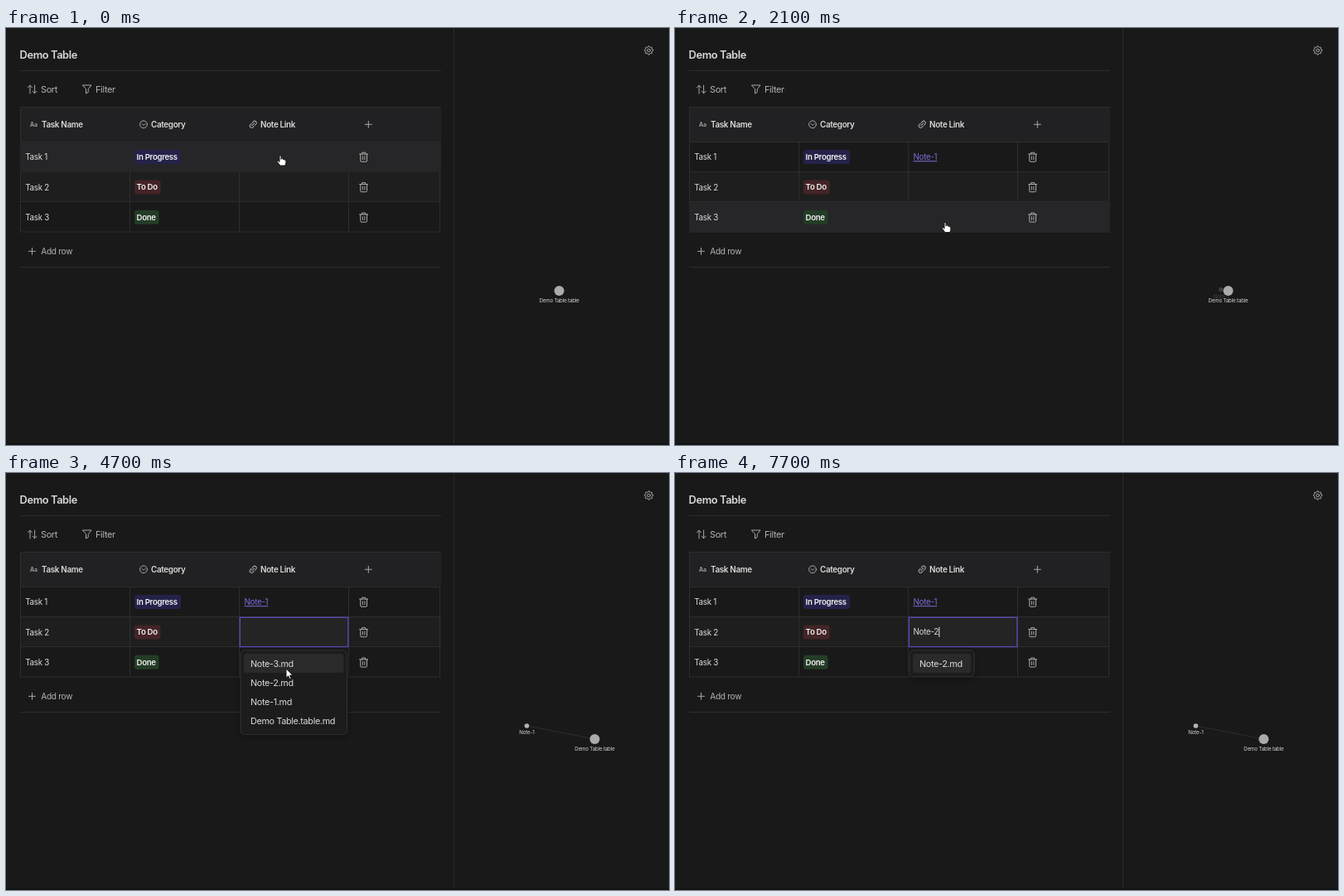
An HTML page for the animation above (8000 ms loop, 800x503 px).

```html
<!DOCTYPE html>
<html lang="en">
<head>
<meta charset="utf-8">
<title>Demo Table</title>
<style>
  html, body { margin: 0; width: 100%; height: 100%; overflow: hidden; background: #191919; }
  svg { display: block; width: 800px; height: 503px; }
  text { font: 9.8px Inter, sans-serif; letter-spacing: -.03em; fill: #dadada; }
  .bold { font-weight: 600; }
  .tool { font-size: 10.9px; fill: #b3b3b3; }
  .item { font-size: 10.8px; }
  .label { font-size: 6.2px; text-anchor: middle; fill: #d4d4d4; }
  .icon { fill: none; stroke: #a8a8a8; stroke-width: 1; stroke-linecap: round; stroke-linejoin: round; }
  .rule { fill: none; stroke: #2d2d2d; }
  .cursor { fill: #fff; stroke: #111; stroke-width: .9; stroke-linejoin: round; }
</style>
</head>
<body>
<svg viewBox="0 0 800 503">
  <defs>
    <g id="trash" class="icon">
      <path d="M-5-3.6H5M-2-3.6V-5.5H2V-3.6M-3.9-3.6V4.3Q-3.9 5.6-2.6 5.6H2.6Q3.9 5.6 3.9 4.3V-3.6M-1.3-1V3M1.3-1V3"/>
    </g>
    <path id="plus" class="icon" d="M-4 0H4M0-4V4"/>
    <filter id="shadow" x="-20%" y="-20%" width="140%" height="150%">
      <feDropShadow dx="0" dy="3" stdDeviation="4" flood-color="#000" flood-opacity=".35"/>
    </filter>
  </defs>

  <rect width="800" height="503" fill="#191919"/>
  <path class="rule" d="M540.5 0V503" stroke-opacity=".8"/>
  <rect y="501" width="800" height="2" fill="#121212"/>

  <text x="16.6" y="36.8" style="font-size:12.8px;font-weight:600">Demo Table</text>
  <path class="rule" d="M17 51.5H525M17 288.5H525"/>
  <path class="icon" d="M29 79V69.2M26.5 71.8L29 69.2L31.5 71.8M34.6 69V78.8M32.2 76.2L34.6 78.8L37 76.2"/>
  <text class="tool" x="42" y="77.6">Sort</text>
  <path class="icon" d="M92.7 69H103L99.2 73.8V77.5L96.5 79V73.8Z"/>
  <text class="tool" x="108" y="77.6">Filter</text>

  <rect x="17" y="95.5" width="508" height="42" fill="#212123"/>
  <rect x="17" y="173.5" width="508" height="36.5" fill="#1e1e1f"/>
  <path class="rule" d="M17 95.5H524.5M17 137.5H524M17 173.5H524M17 209.5H524M17 246H524M17.5 95.5V246M523.5 137.5V246M149.5 137.5V246M281.5 137.5V246M413.5 137.5V246"/>
  <rect id="hover" x="17" width="508" height="36.5" fill="#262628"/>

  <text x="29" y="118.6" style="font-size:7px;font-weight:600;fill:#a8a8a8">Aa</text>
  <text class="bold" x="43" y="119.7">Task Name</text>
  <circle class="icon" cx="166" cy="116.3" r="4.4"/>
  <path class="icon" d="M164.2 115.6L166 117.4L167.8 115.6"/>
  <text class="bold" x="175" y="119.7">Category</text>
  <g class="icon" transform="translate(298.2 116.3) rotate(-45)">
    <path d="M-.8-2.2H-2.6A2.2 2.2 0 0 0-2.6 2.2H-.8M.8-2.2H2.6A2.2 2.2 0 0 1 2.6 2.2H.8M-2 0H2"/>
  </g>
  <text class="bold" x="307" y="119.7">Note Link</text>
  <use href="#plus" x="437.3" y="116.3"/>

  <g id="rows"></g>
  <text id="link" x="287.5" y="159.2" fill="#7f6bd8" style="fill:#7f6bd8;text-decoration:underline">Note-1</text>

  <use href="#plus" x="31.5" y="269.3"/>
  <text class="tool" x="42.3" y="273" style="font-size:10.1px">Add row</text>

  <g transform="translate(775.6 27)">
    <path id="gear" class="icon"/>
    <circle class="icon" r="1.8"/>
  </g>

  <path id="edge" class="rule"/>
  <g id="note">
    <circle r="2.8" fill="#b4b4b4"/>
    <text class="label" y="10.4">Note-1</text>
  </g>
  <g id="table">
    <circle r="6" fill="#ababab"/>
    <text class="label" y="14">Demo Table.table</text>
  </g>

  <g id="editor">
    <rect x="282.3" y="137.8" width="130.6" height="35.4" fill="#242425" stroke="#5c48b0" stroke-width="1.4"/>
    <text id="typed" x="287.5" y="158.9"></text>
    <path id="caret" d="M0 149.5V161.5" stroke="#e6e6e6"/>
    <rect id="menu" x="283" y="177.5" rx="5" fill="#1c1c1d" stroke="#303030" filter="url(#shadow)"/>
    <rect id="pick" x="287" height="23" rx="3.5" fill="#2a2a2b"/>
    <g id="items"></g>
  </g>

  <g class="cursor">
    <path id="hand" d="M-1 .3Q0-.7 1 .3V4.4Q2-.0 3.2 4.6Q4.4 3.9 5 5.2Q6.6 4.8 6.8 6.4V8.4Q6.6 10.2 5.6 12H-.2Q-1.8 9.6-3.6 7.6Q-4 6-2.4 6.3L-1 7.6Z"/>
    <path id="arrow" d="M0 0V11.2L2.6 8.8L4.3 12.6L6.1 11.8L4.4 8.1H8Z"/>
    <g id="beam" fill="none">
      <path d="M-2.5-5.5Q0-5.5 0-4Q0-5.5 2.5-5.5M0-4V4M-2.5 5.5Q0 5.5 0 4Q0 5.5 2.5 5.5M-1.6 1H1.6" stroke="#111" stroke-width="2.6"/>
      <path d="M-2.5-5.5Q0-5.5 0-4Q0-5.5 2.5-5.5M0-4V4M-2.5 5.5Q0 5.5 0 4Q0 5.5 2.5 5.5M-1.6 1H1.6" stroke="#eee"/>
    </g>
  </g>
</svg>

<script>
const $ = id => document.getElementById(id);
const LOOP = 8000, STEP = 100, ROW = 36.4, PITCH = 23.2;
const NOTES = ['Note-3.md', 'Note-2.md', 'Note-1.md', 'Demo Table.table.md'];
const OPEN = [300, 3100], CHOSEN = 1900, SPAWN = 2100;
const KEYS = [[5400, 'N'], [5500, 'o'], [5800, 't'], [6100, 'e'], [7500, '-'], [7700, '2']];

// Tracks: time, x, y
const MOUSE = [[0, 331, 154], [400, 331, 154], [800, 332, 179], [1000, 332, 184], [1500, 326, 234.5],
  [2100, 326, 234.5], [2700, 332, 195], [3100, 338, 196], [3400, 339, 209], [3700, 338, 236]];
const NOTE = [[SPAWN, 658.8, 315.5], [2900, 627.6, 305], [4200, 628.4, 305]];
const TABLE = [[SPAWN, 667.5, 317], [2900, 710.4, 321]];

const smooth = u => u * u * (3 - 2 * u);
const easeOut = u => 1 - (1 - u) ** 3;

function along(track, t, ease) {
  const next = track.findIndex(k => k[0] > t);
  if (next === 0) return track[0].slice(1);
  if (next < 0) return track.at(-1).slice(1);
  const a = track[next - 1], b = track[next];
  const u = ease((t - a[0]) / (b[0] - a[0]));
  return [a[1] + (b[1] - a[1]) * u, a[2] + (b[2] - a[2]) * u];
}

function set(el, attrs) {
  for (const name in attrs) el.setAttribute(name, attrs[name]);
}
const show = (el, on) => { el.style.display = on ? '' : 'none'; };
const place = (el, x, y) => set(el, { transform: `translate(${x} ${y})` });

$('rows').innerHTML = [['In Progress', 56, '#25224a'], ['To Do', 31.5, '#442427'], ['Done', 29.5, '#243d26']]
  .map(([name, w, color], i) => `<g transform="translate(0 ${i * ROW})">
    <text x="23.3" y="159.2">Task ${i + 1}</text>
    <rect x="155" y="147" width="${w}" height="17" rx="3" fill="${color}"/>
    <text class="bold" x="157.6" y="159" style="font-size:9.6px;fill:#f0f0f0">${name}</text>
    <use href="#trash" x="431.6" y="155.7"/></g>`).join('');

$('items').innerHTML = NOTES.map(() => '<text class="item" x="295"></text>').join('');
const items = [...$('items').children];

const teeth = Array.from({ length: 32 }, (_, i) => {
  const r = i % 4 < 2 ? 5.2 : 4, a = (i - .5) * Math.PI / 16;
  return `${(r * Math.cos(a)).toFixed(2)} ${(r * Math.sin(a)).toFixed(2)}`;
});
set($('gear'), { d: `M${teeth.join('L')}Z` });

function drawEditor(t, row, y) {
  const keys = row ? KEYS.filter(k => k[0] <= t) : [];
  const text = keys.map(k => k[1]).join('');
  const list = NOTES.filter(n => n.startsWith(text));
  const width = text ? 78 : 128.5;
  place($('editor'), 0, row * ROW);

  $('typed').textContent = text;
  const x = 288.3 + (text ? $('typed').getComputedTextLength() : 0);
  const since = t - (keys.length ? keys.at(-1)[0] : OPEN[row]);
  place($('caret'), x, 0);
  show($('caret'), Math.floor(since / 500) % 2 === 0);

  const over = Math.floor((y - row * ROW - 181.5) / PITCH);
  const picked = text ? 0 : Math.max(0, Math.min(over, list.length - 1));
  set($('menu'), { width, height: list.length * PITCH + 8.6 });
  set($('pick'), { width: width - 8, y: 181.7 + picked * PITCH });
  items.forEach((el, i) => {
    el.textContent = list[i] || '';
    set(el, { y: 197.2 + i * PITCH });
  });
}

function draw(t) {
  const row = t >= OPEN[1] ? 1 : 0;
  const editing = t >= OPEN[row] && (row === 1 || t < CHOSEN);
  const [x, y] = along(MOUSE, t, smooth);
  const typing = t >= KEYS[0][0];
  const onMenu = editing && y > 174 + row * ROW;

  show($('editor'), editing);
  if (editing) drawEditor(t, row, y);

  const shape = typing ? '' : onMenu ? 'arrow' : editing ? 'beam' : 'hand';
  for (const id of ['hand', 'arrow', 'beam']) {
    show($(id), id === shape);
    place($(id), x, y);
  }
  show($('hover'), !typing && !onMenu);
  set($('hover'), { y: 137.5 + ROW * Math.floor((y - 137.5) / ROW) });
  show($('link'), t >= CHOSEN);

  const [nx, ny] = along(NOTE, t, easeOut), [tx, ty] = along(TABLE, t, easeOut);
  const fade = Math.min(1, .22 + Math.max(0, t - SPAWN) / 500);
  place($('note'), nx, ny);
  place($('table'), tx, ty);
  set($('edge'), { d: `M${nx} ${ny}L${tx} ${ty}`, opacity: fade });
  set($('note'), { opacity: fade });
  show($('note'), t >= SPAWN - STEP);
  show($('edge'), t >= SPAWN - STEP);
}

const start = performance.now();
function tick() {
  const t = (performance.now() - start) % LOOP;
  draw(Math.floor(t / STEP) * STEP);
  requestAnimationFrame(tick);
}
tick();
</script>
</body>
</html>
```
